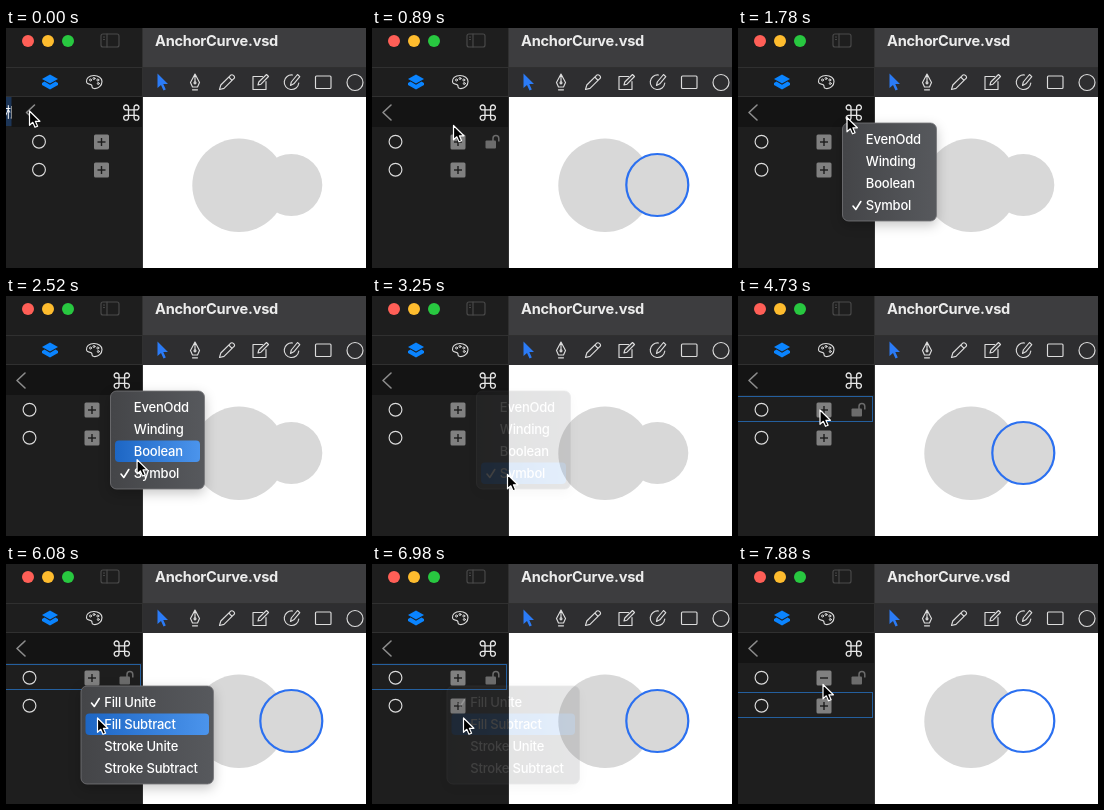
An HTML page for the animation above (8 s loop, 360 px wide and 240 px high).

```html
<!DOCTYPE html>
<html lang="en">
<head>
<meta charset="utf-8">
<title>Boolean symbol panel</title>
<style>
  html, body { margin: 0; width: 100%; height: 100%; overflow: hidden; background: #fff; }
  svg { display: block; width: 360px; height: 240px; }
  text { font-family: Inter, "Noto Sans", sans-serif; fill: #fff; }
  .title { font-size: 14.6px; font-weight: 700; letter-spacing: -.25px; fill: #ececec; }
  .old { font: 14px "Noto Sans CJK SC", "Noto Sans CJK JP", sans-serif; }
  .menu text { font-size: 13px; font-weight: 500; letter-spacing: -.2px; }
  .line { fill: none; stroke: #dcdcdc; stroke-width: 1.15; stroke-linejoin: round; stroke-linecap: round; }
  .outline { fill: none; stroke: #2b70f0; stroke-width: 2.2; }
  .border { fill: none; stroke: #245f9e; }
  .menu > .panel { fill: url(#glass); stroke: #77777a; stroke-width: .8; filter: drop-shadow(0 4px 6px rgba(0,0,0,.22)); }
</style>
</head>
<body>
<svg viewBox="0 0 360 240">
  <defs>
    <linearGradient id="glass">
      <stop offset="0" stop-color="#444548"/>
      <stop offset="1" stop-color="#57595d"/>
    </linearGradient>
    <linearGradient id="blue">
      <stop offset="0" stop-color="#1d66c4"/>
      <stop offset="1" stop-color="#4b94ec"/>
    </linearGradient>
    <clipPath id="side"><path d="M0 0H136V240H0z"/></clipPath>
  </defs>

  <!-- window -->
  <path fill="#fff" d="M0 0H360V240H0z"/>
  <path fill="#3d3d3f" d="M137 0H360V39H137z"/>
  <path fill="#2e2e30" d="M137 39H360V69H137z"/>
  <path fill="#1e1e1e" d="M0 0H136V240H0z"/>
  <path fill="#303030" d="M136 0h1V240h-1zM0 39H360v1H0zM0 68H137v1H0z"/>
  <circle cx="22" cy="13" r="6" fill="#ff5f57"/>
  <circle cx="42" cy="13" r="6" fill="#febc2e"/>
  <circle cx="62" cy="13" r="6" fill="#28c840"/>
  <g class="line" style="stroke:#4a4a4a">
    <rect x="95" y="6" width="18" height="13" rx="2"/>
    <path d="M101 6V19M97.500 9h1M97.500 11.500h1"/>
  </g>
  <text class="title" x="149" y="18">AnchorCurve.vsd</text>

  <!-- tabs -->
  <g fill="#0a84ff">
    <path d="M44 46.500L52 51L44 55.500L36 51z"/>
    <path d="M36 55L38.500 53.500L44 56.700L49.500 53.500L52 55V57L44 61.500L36 57z"/>
  </g>
  <g class="line">
    <path d="M88 47.500C83 47.500 80 50.500 80.500 54C81 57 84 55.500 85.500 57C87 58.500 84.500 60 88 60.500C92.500 61 96 57.500 96 53.500C96 50 92.500 47.500 88 47.500z"/>
    <g stroke-width="1">
      <circle cx="84.500" cy="52" r="1"/><circle cx="88" cy="50.500" r="1"/>
      <circle cx="91.800" cy="52" r="1"/><circle cx="92.300" cy="55.500" r="1"/>
    </g>
  </g>

  <!-- toolbar -->
  <path fill="#2b7bf6" d="M151.500 45.500V60L155 57L157.500 62.500L159.800 61.400L157.300 56H162z"/>
  <g class="line">
    <path d="M189 46L184.500 54.500L186.500 59H191.500L193.500 54.500zM189 47V54M186.500 61.800H191.500"/>
    <circle cx="189" cy="54.800" r="1"/>
    <path d="M213.500 61.500L214.800 57L224.500 47.300Q226 46 227.700 47.700T227.800 50.700L218 60.400zM222.800 49L226 52.300"/>
    <path d="M256.500 48.500H247V61.500H260V53.500M252 57L252.800 54L260.500 46.500L262.500 48.500L255 56.200z"/>
    <path d="M286.500 47A7.300 7.300 0 1 0 292.800 55M284.500 57.500L285.300 54L291.500 46.500L293.800 48.600L287.800 55.800z"/>
    <rect x="309.500" y="48" width="15.500" height="12.500" rx="1"/>
    <circle cx="349" cy="54.500" r="8"/>
  </g>

  <!-- canvas -->
  <circle cx="233" cy="157.300" r="46.700" fill="#d8d8d8"/>
  <circle id="cut" cx="285.300" cy="157" r="31" fill="#d8d8d8"/>
  <circle class="outline" id="lit1" cx="285.300" cy="157" r="31"/>
  <circle class="outline" id="lit2" cx="233" cy="157.300" r="46.500"/>

  <!-- layer list: the new panel slides over the old header -->
  <g clip-path="url(#side)">
    <path fill="#1c3557" d="M0 69H20V98H0z"/>
    <text class="old" x="-1" y="89">根</text>
    <rect class="border" id="border1" x="-.5" y="100.500" width="135" height="25"/>
    <rect class="border" id="border2" x="-.5" y="128.500" width="135" height="25"/>
    <g id="slide">
      <path fill="#141414" d="M-4 69H140V99H-4z"/>
      <path class="line" style="stroke:#8c8c8c;stroke-width:1.600" d="M19 77L11 84.500L19 92"/>
      <path class="line" style="stroke:#e6e6e6;stroke-width:1.350" d="M113 81.800H118.600V87.400H113zM113 81.800H110.700A2.400 2.400 0 1 1 113 79.500zM118.600 81.800V79.500A2.400 2.400 0 1 1 120.900 81.800zM118.600 87.400H120.900A2.400 2.400 0 1 1 118.600 89.700zM113 87.400V89.700A2.400 2.400 0 1 1 110.700 87.400z"/>
      <g id="rows"></g>
    </g>
  </g>

  <g id="menus"></g>
  <path id="cursor" fill="#000" stroke="#fff" stroke-width="1.200" stroke-linejoin="round"
    d="M0 0V14.300L3.300 11.300L5.500 16.300L8.100 15.200L5.900 10.300H10.400z"/>
</svg>

<script>
const $ = id => document.getElementById(id);
const LOOP = 8000;

// Cursor moves: start, end, steps, target x, target y
const moves = [
  [590, 740, 2, 70, 106], [890, 890, 1, 81.5, 97.5], [1040, 1630, 5, 109, 89.5],
  [1930, 2660, 6, 135.5, 178.5], [3550, 4130, 5, 69, 111], [4430, 4730, 3, 82, 114],
  [5630, 6080, 4, 91.5, 154], [7430, 7430, 1, 90, 147], [7580, 7580, 1, 83, 112],
  [7730, 7730, 1, 83, 114], [7880, 7880, 1, 85, 120.5]
];
// Held values: time, value
const slide = [[0, 9.5], [150, 3], [300, 0]];
const border = [[0, 0], [740, 1], [890, 0], [3690, 2], [3990, 1], [7130, 0], [7430, 2], [7580, 1], [7880, 2]];
const lit = [[0, 0], [740, 1], [1040, 0], [3840, 2], [3990, 1], [7130, 0], [7430, 2], [7580, 1]];

const menus = [
  { x: 104.5, y: 95, w: 94, tick: 3, items: ['EvenOdd', 'Winding', 'Boolean', 'Symbol'],
    open: 1780, blink: 3100, fade: 3250, close: 3400 },
  { x: 75, y: 122, w: 132.5, tick: 0, items: ['Fill Unite', 'Fill Subtract', 'Stroke Unite', 'Stroke Subtract'],
    open: 5180, blink: 6830, fade: 6980, close: 7130 }
];

$('rows').innerHTML = [1, 2].map(n => `
  <g transform="translate(0 ${28 * n + 86})">
    <circle class="line" cx="23.5" cy="-.3" r="6.4"/>
    <rect x="78.500" y="-7.500" width="15" height="15" rx="1.500" fill="#808080"/>
    <path d="M82 0H90" stroke="#1c1c1c" stroke-width="1.400"/>
    <path id="plus${n}" d="M86 -4V4" stroke="#1c1c1c" stroke-width="1.400"/>
    <g id="lock${n}">
      <rect x="113.500" y="-1.500" width="10.500" height="8" rx="1" fill="#6c6c6c"/>
      <path d="M121 -1V-3.500A2.900 2.900 0 0 1 126.800 -3.500V-.5" fill="none" stroke="#6c6c6c" stroke-width="1.500"/>
    </g>
  </g>`).join('');

$('menus').innerHTML = menus.map((m, i) => `
  <g class="menu" id="menu${i}" transform="translate(${m.x} ${m.y})">
    <rect class="panel" width="${m.w}" height="98" rx="6"/>
    <rect id="pick${i}" x="4.5" width="${m.w - 9}" height="21.500" rx="4" fill="url(#blue)"/>
    <path class="line" style="stroke:#fff;stroke-width:1.600" d="M10.500 ${17 + 22 * m.tick}l2.800 3.500l5 -8"/>
    ${m.items.map((s, k) => `<text x="23.3" y="${21 + 22 * k}">${s}</text>`).join('')}
  </g>`).join('');

const held = (list, t) => list.filter(e => e[0] <= t).pop()[1];
const show = (id, on) => $(id).setAttribute('visibility', on ? 'visible' : 'hidden');

function cursorAt(t) {
  let x = 23.5, y = 83;
  for (const [start, end, n, tx, ty] of moves) {
    if (t < start) break;
    const step = n > 1 ? Math.floor((t - start) / (end - start) * (n - 1) + .05) + 1 : 1;
    const p = Math.min(1, step / n);
    x += (tx - x) * p;
    y += (ty - y) * p;
  }
  return [x, y];
}

function drawMenu(m, i, t, y) {
  const open = t >= m.open && t < m.close;
  const k = Math.floor((y - m.y - 5.5) / 22);
  const blink = t >= m.blink && t < m.fade;
  $('menu' + i).style.display = open ? '' : 'none';
  $('menu' + i).style.opacity = t >= m.fade ? .15 : 1;
  $('pick' + i).style.display = k >= 0 && k < 4 && !blink ? '' : 'none';
  $('pick' + i).setAttribute('y', 5.5 + 22 * k);
}

function draw() {
  const t = performance.now() % LOOP;
  const [x, y] = cursorAt(t);
  const cut = t >= menus[1].close;
  $('cursor').setAttribute('transform', `translate(${x} ${y})`);
  $('slide').setAttribute('transform', `translate(${held(slide, t)})`);
  for (const n of [1, 2]) {
    show('border' + n, held(border, t) === n);
    show('lit' + n, held(lit, t) === n);
    show('lock' + n, held(lit, t) === n);
  }
  show('plus1', !cut);
  $('cut').setAttribute('fill', cut ? '#fff' : '#d8d8d8');
  menus.forEach((m, i) => drawMenu(m, i, t, y));
  requestAnimationFrame(draw);
}
draw();
</script>
</body>
</html>
```
